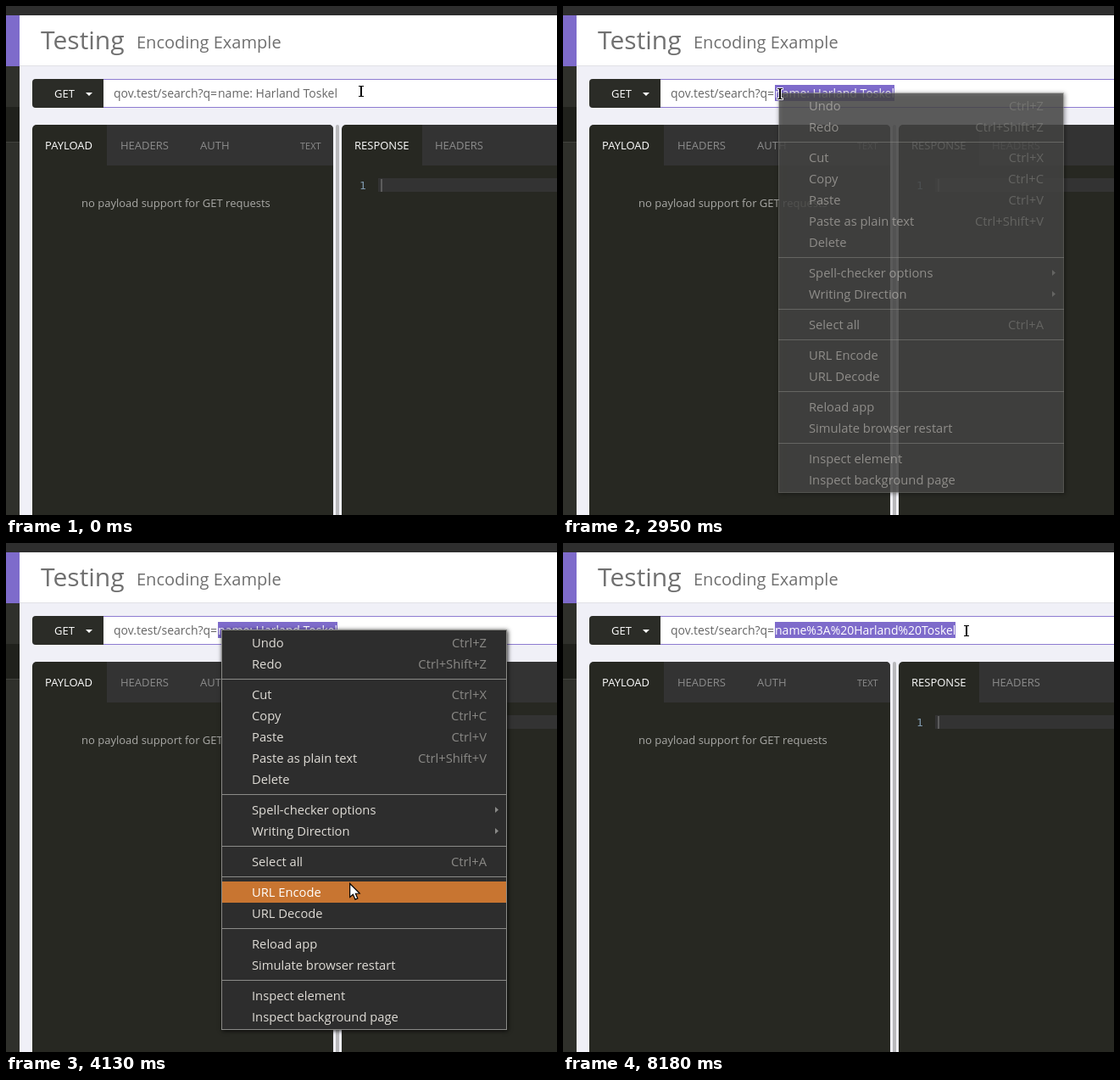
These frames come from a looping animation (650 px wide and 600 px high, 9720 ms). An HTML page with a canvas:

```html
<!DOCTYPE html>
<html lang="en">
<head>
<meta charset="utf-8">
<title>Encoding Example</title>
<style>
  html, body { margin: 0; width: 100%; height: 100%; overflow: hidden; background: #f0f0f7; }
  canvas { display: block; }
</style>
</head>
<body>
<canvas id="stage" width="650" height="600"></canvas>
<script>
const ctx = document.getElementById('stage').getContext('2d');
const LOOP = 9720;
const SANS = '"Open Sans", "Noto Sans", sans-serif';
const MONO = '"DejaVu Sans Mono", monospace';
const PURPLE = '#7e6bcb';
const DARK = '#272822';

const URL_BASE = 'qov.test/search?q=';
const PLAIN = 'name: Harland Toskel';
const ENCODED = encodeURIComponent('name:') + '%20Harland%20Toskel';
const QUERY_X = 250;

// Pointer path: time, x, y, eased
const PATH = [
  [0, 419, 100], [400, 404, 101, 1], [860, 404, 101], [1810, 258, 102, 1],
  [1890, 258, 102], [2070, 256, 103], [3270, 256, 103], [3470, 319, 140],
  [3670, 392, 277], [3870, 407, 365], [4130, 405, 404], [5600, 405, 404],
  [6000, 477, 157, 1], [6200, 482, 122], [6580, 484, 105.5],
  [6780, 476, 102.5], [LOOP, 476, 102.5]
];

const MENU = { x: 254, y: 102, w: 337, h: 472 };
const GROUPS = [
  [['Undo', 'Ctrl+Z'], ['Redo', 'Ctrl+Shift+Z']],
  [['Cut', 'Ctrl+X'], ['Copy', 'Ctrl+C'], ['Paste', 'Ctrl+V'],
   ['Paste as plain text', 'Ctrl+Shift+V'], ['Delete']],
  [['Spell-checker options', '>'], ['Writing Direction', '>']],
  [['Select all', 'Ctrl+A']],
  [['URL Encode'], ['URL Decode']],
  [['Reload app'], ['Simulate browser restart']],
  [['Inspect element'], ['Inspect background page']]
];

function rect(x, y, w, h, color) {
  ctx.fillStyle = color;
  ctx.fillRect(x, y, w, h);
}

function round(x, y, w, h, radii, color) {
  ctx.fillStyle = color;
  ctx.beginPath();
  ctx.roundRect(x, y, w, h, radii);
  ctx.fill();
}

function poly(points, color) {
  ctx.fillStyle = color;
  ctx.beginPath();
  points.forEach(([x, y]) => ctx.lineTo(x, y));
  ctx.closePath();
  ctx.fill();
}

function text(str, x, y, size, color, align = 'left', family = SANS) {
  ctx.font = `${size}px ${family}`;
  ctx.textAlign = align;
  ctx.fillStyle = color;
  ctx.fillText(str, x, y);
}

function pointerAt(t) {
  const i = PATH.findIndex(key => key[0] > t);
  const [t0, x0, y0] = PATH[i - 1];
  const [t1, x1, y1, eased] = PATH[i];
  let k = (t - t0) / (t1 - t0);
  if (eased) k = k * k * (3 - 2 * k);
  return [x0 + (x1 - x0) * k, y0 + (y1 - y0) * k];
}

function drawPage() {
  rect(0, 0, 650, 600, '#f0f0f7');
  rect(16, 11, 634, 60, '#fff');
  rect(16, 70, 634, 1, '#e1e1e6');
  rect(0, 0, 650, 11, '#2e2e2e');
  rect(0, 11, 16, 60, PURPLE);
  rect(0, 71, 16, 529, '#2f302b');
  rect(0, 119, 16, 41, '#20211c');
  rect(0, 160, 16, 1, '#41423d');

  text('Testing', 41, 51, 30, '#707070');
  text('Encoding Example', 154, 50, 20, '#707070');

  rect(115, 86, 535, 34, '#fff');
  rect(115, 86, 535, 1, '#8d7bd1');
  rect(115, 119, 535, 1, '#8d7bd1');
  round(31, 86, 84, 34, [4, 0, 0, 4], '#2b2c27');
  text('GET', 57, 108, 13, '#fff');
  poly([[94, 102], [102, 102], [98, 106]], '#fff');

  round(31, 140, 355, 480, 5, DARK);
  round(119, 140, 267, 48, [0, 5, 0, 0], '#333');
  round(396, 140, 274, 480, 5, DARK);
  rect(491, 140, 159, 48, '#333');
  round(389, 140, 4, 480, 2, '#b9b9bc');

  text('PAYLOAD', 46, 169, 13, '#fff');
  text('HEADERS', 135, 169, 13, '#8c8c8c');
  text('AUTH', 229, 169, 13, '#8c8c8c');
  text('TEXT', 347, 169, 11, '#8c8c8c');
  text('RESPONSE', 411, 169, 13, '#fff');
  text('HEADERS', 506, 169, 13, '#8c8c8c');
  text('no payload support for GET requests', 89, 237, 13, '#a9a9a6');

  rect(439, 203, 211, 16, '#333');
  rect(442, 204, 2, 15, '#5c5c5c');
  text('1', 417, 216, 13, '#7f98ad', 'left', MONO);
}

function selectionStart(str, x) {
  let best = QUERY_X;
  for (let i = 1; i <= str.length; i++) {
    const edge = QUERY_X + ctx.measureText(str.slice(0, i)).width;
    if (Math.abs(edge - x) < Math.abs(best - x)) best = edge;
  }
  return best;
}

function drawUrl(t, pointerX) {
  const query = t < 5430 ? PLAIN : ENCODED;
  text(URL_BASE, 127, 108, 14, '#666');
  text(query, QUERY_X, 108, 14, '#666');
  const end = Math.round(QUERY_X + ctx.measureText(query).width);
  if (t >= 170 && t < 670) rect(end, 93, 1, 19, '#555');
  if (t < 860) return;

  const start = t < 2070 ? selectionStart(query, pointerX - 2) : QUERY_X;
  if (start >= end - 1) return;
  ctx.save();
  ctx.beginPath();
  ctx.rect(start, 93, end - start, 19);
  ctx.clip();
  rect(start, 93, end - start, 19, PURPLE);
  text(query, QUERY_X, 108, 14, '#fff');
  ctx.restore();
}

function drawMenu(pointerY, hovering) {
  const { x, y, w, h } = MENU;
  ctx.save();
  ctx.shadowColor = 'rgba(0,0,0,.85)';
  ctx.shadowBlur = 5;
  ctx.shadowOffsetX = 1;
  ctx.shadowOffsetY = 1;
  rect(x, y, w, h, '#8b8b88');
  ctx.restore();
  rect(x + 1, y + 1, w - 2, h - 2, '#2d2d2d');

  let top = y + 3;
  GROUPS.forEach((group, g) => {
    if (g) {
      rect(x, top + 5, w, 1, '#8b8b88');
      top += 11;
    }
    for (const [label, hint] of group) {
      const active = hovering && pointerY >= top && pointerY < top + 25;
      if (active) rect(x + 1, top, w - 2, 25, '#c87531');
      text(label, 290, top + 18, 14.75, active ? '#fff' : '#dfdcd6');
      if (hint === '>') {
        poly([[577, top + 9], [581, top + 12.5], [577, top + 16]], '#8a8a88');
      } else if (hint) {
        text(hint, 567, top + 18, 14.75, active ? '#fff' : '#8a8986', 'right');
      }
      top += 25;
    }
  });
}

function drawArrow(x, y) {
  ctx.save();
  ctx.translate(x + .5, y + .5);
  ctx.beginPath();
  [[0, 0], [0, 16], [3.7, 12.7], [6.3, 18.6], [9.2, 17.4], [6.7, 11.7], [11.5, 11.5]]
    .forEach(p => ctx.lineTo(...p));
  ctx.closePath();
  ctx.fillStyle = '#fff';
  ctx.fill();
  ctx.strokeStyle = '#000';
  ctx.lineWidth = 1.2;
  ctx.stroke();
  ctx.restore();
}

function drawBeam(x, y) {
  ctx.save();
  ctx.translate(Math.round(x), Math.round(y));
  const bars = [[-3, -6, 6, 1], [-1, -6, 2, 13], [-3, 6, 6, 1]];
  bars.forEach(([bx, by, w, h]) => rect(bx - 1, by - 1, w + 2, h + 2, 'rgba(255,255,255,.85)'));
  bars.forEach(([bx, by, w, h]) => rect(bx, by, w, h, '#000'));
  ctx.restore();
}

function menuAlpha(t) {
  if (t < 2950 || t >= 5390) return 0;
  return t < 2990 || t >= 5350 ? .5 : 1;
}

function draw(t) {
  const [x, y] = pointerAt(t);
  const alpha = menuAlpha(t);
  const arrow = t >= 3310 && (t < 5600 || y >= 120);
  drawPage();
  drawUrl(t, x);
  if (alpha) {
    ctx.globalAlpha = alpha;
    drawMenu(y, arrow);
    ctx.globalAlpha = 1;
  }
  if (t < 8180) (arrow ? drawArrow : drawBeam)(x, y);
}

const begin = performance.now();
function tick() {
  const t = (performance.now() - begin) % LOOP;
  draw(Math.floor((t + 10) / 40) * 40 % LOOP - (t >= 30 ? 10 : 0) + (t >= LOOP - 10 ? 10 : 0));
  requestAnimationFrame(tick);
}
tick();
</script>
</body>
</html>
```
